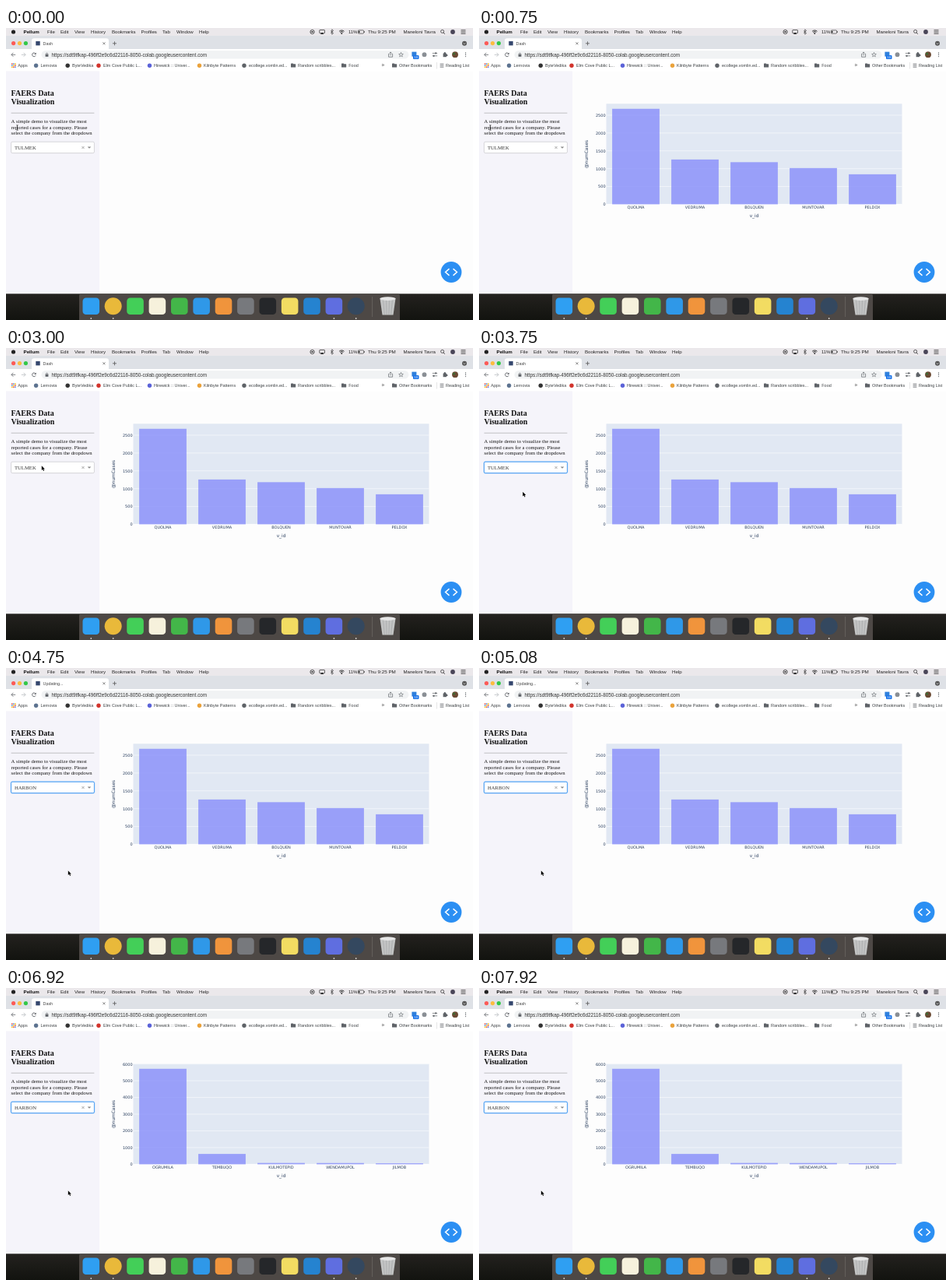
An HTML page with a canvas that plays this animation: 600 by 375 pixels, repeating every 8 s.

```html
<!DOCTYPE html>
<html lang="en">
<head>
<meta charset="utf-8">
<title>Dash</title>
<style>
  html, body { margin: 0; width: 100%; height: 100%; overflow: hidden; background: #fdfdfd; }
  canvas { display: block; width: 600px; height: 375px; }
</style>
</head>
<body>
<canvas id="stage"></canvas>
<script>
const W = 600, H = 375, LOOP = 8000;
const UI = '"Liberation Sans", Arial, sans-serif';
const SERIF = '"Liberation Serif", Times, serif';
const CHART = '"DejaVu Sans", Verdana, sans-serif';

const canvas = document.getElementById('stage');
const dpr = window.devicePixelRatio || 1;
canvas.width = W * dpr;
canvas.height = H * dpr;
const ctx = canvas.getContext('2d');

// Moments (ms) at which the page changes state
const SHOWN = 250, FOCUSED = 3250, PICKED = 4500, UPDATED = 5300;

const FIRST = {
  names: ['QUOLMA', 'VEDRUMA', 'BOLQUEN', 'MUNTOVAR', 'PELDOX'],
  values: [2680, 1257, 1182, 1017, 842], step: 500
};
const SECOND = {
  names: ['OGRUMILA', 'TEMBUQO', 'KULMOTEPID', 'WENDAMUPOL', 'JILMOB'],
  values: [5715, 620, 80, 76, 60], step: 1000
};

// Pointer stops: time, x, y
const PATH = [
  [1050, 14.5, 128], [1700, 85.5, 100.2], [2250, 85.5, 100.2],
  [2900, 45.8, 151.2], [3400, 45.8, 151.2], [4350, 79.8, 260.2]
];

function text(s, x, y, size, color = '#333', font = UI, align = 'left', weight = 'normal') {
  ctx.font = `${weight} ${size}px ${font}`;
  ctx.textAlign = align;
  ctx.fillStyle = color;
  ctx.fillText(s, x, y);
}

function rect(x, y, w, h, color) {
  ctx.fillStyle = color;
  ctx.fillRect(x, y, w, h);
}

function box(x, y, w, h, r, fill, stroke, width = 0.6) {
  ctx.beginPath();
  ctx.roundRect(x, y, w, h, r);
  if (fill) { ctx.fillStyle = fill; ctx.fill(); }
  if (stroke) { ctx.strokeStyle = stroke; ctx.lineWidth = width; ctx.stroke(); }
}

function disc(x, y, r, fill) {
  ctx.beginPath();
  ctx.arc(x, y, r, 0, Math.PI * 2);
  ctx.fillStyle = fill;
  ctx.fill();
}

function arc(x, y, r, from, to, color, width = 0.8) {
  ctx.beginPath();
  ctx.arc(x, y, r, from, to);
  ctx.strokeStyle = color;
  ctx.lineWidth = width;
  ctx.stroke();
}

function line(points, color, width = 0.8) {
  ctx.beginPath();
  points.forEach(([x, y]) => ctx.lineTo(x, y));
  ctx.strokeStyle = color;
  ctx.lineWidth = width;
  ctx.stroke();
}

function shape(points, fill, stroke, width = 0.6) {
  ctx.beginPath();
  points.forEach(([x, y]) => ctx.lineTo(x, y));
  ctx.closePath();
  if (stroke) { ctx.strokeStyle = stroke; ctx.lineWidth = width; ctx.stroke(); }
  ctx.fillStyle = fill;
  ctx.fill();
}

function menuBar() {
  const ink = '#222';
  rect(0, 0, W, 10, '#ebe8eb');
  disc(9.5, 5, 2.6, ink);
  text('Pellum', 22.5, 7.1, 6.2, '#111', UI, 'left', 'bold');
  const items = [['File', 53], ['Edit', 70], ['View', 88], ['History', 109], ['Bookmarks', 136],
    ['Profiles', 173.5], ['Tab', 201], ['Window', 219], ['Help', 248]];
  items.forEach(([s, x]) => text(s, x, 7.1, 6.1, ink));

  arc(393.5, 5, 2.6, 0, 7, ink);
  disc(393.5, 5, 1.1, ink);
  box(402.8, 2.5, 6.6, 4.2, 0.6, null, ink, 0.7);
  shape([[404, 8], [408.2, 8], [406.1, 5.4]], ink);
  line([[417, 3.4], [420.6, 6.7], [418.8, 8.2], [418.8, 1.8], [420.6, 3.4], [417, 6.7]], ink, 0.6);
  [1.4, 3, 4.6].forEach(r => arc(431.3, 7.6, r, -2.35, -0.8, ink, 0.9));
  disc(431.3, 7.4, 0.7, ink);
  text('11%', 440, 7.1, 5.9, ink);
  box(452.2, 2.9, 7.4, 4.2, 1, null, ink, 0.6);
  rect(453, 3.7, 1.4, 2.6, ink);
  rect(460.2, 4.2, 0.7, 1.6, ink);
  text('Thu 9:25 PM', 465, 7.1, 6.25, ink);
  text('Maneloni Tavra', 510.5, 7.1, 6.1, ink);
  arc(560.6, 4.4, 2, 0, 7, ink, 0.7);
  line([[562, 5.9], [563.8, 7.8]], ink, 0.8);
  disc(574, 5, 2.9, '#4a4658');
  [2.8, 5, 7.2].forEach(y => line([[584.5, y], [590.5, y]], ink, 0.8));
}

function tabStrip(title) {
  rect(0, 10, W, 18, '#dee1e6');
  disc(9.6, 19.6, 2.6, '#fc5b57');
  disc(17.5, 19.6, 2.6, '#fdbc40');
  disc(25.4, 19.6, 2.6, '#34c84a');
  box(33, 13.2, 99, 18, 3.2, '#fff');
  rect(38.3, 17, 5.4, 5.4, '#35476e');
  text(title, 47.5, 21.9, 5.4, '#444');
  line([[124.4, 18.3], [127.4, 21.3]], '#555', 0.7);
  line([[127.4, 18.3], [124.4, 21.3]], '#555', 0.7);
  line([[137, 19.8], [142, 19.8]], '#555');
  line([[139.5, 17.3], [139.5, 22.3]], '#555');
  disc(589, 19.8, 3, '#555');
  line([[587.6, 19.3], [589, 20.7], [590.4, 19.3]], '#fff', 0.7);
}

function toolbar() {
  const ink = '#5f6368', pale = '#b7babf';
  rect(0, 27, W, 14, '#fff');
  line([[12.2, 34.3], [7, 34.3]], ink);
  line([[9.4, 31.8], [6.9, 34.3], [9.4, 36.8]], ink);
  line([[19.8, 34.3], [25, 34.3]], pale);
  line([[22.6, 31.8], [25.1, 34.3], [22.6, 36.8]], pale);
  arc(36, 34.3, 2.4, 0.4, 5.5, ink, 0.9);
  shape([[38.7, 31.5], [38.7, 34], [36.2, 34]], ink);

  box(45.5, 29, 472, 10.6, 5.3, '#f1f3f4');
  rect(50.6, 33.6, 3.8, 3.2, ink);
  arc(52.5, 33.4, 1.2, Math.PI, 0, ink, 0.7);
  text('https://sdt9tfkap-496ff2e9c6d22116-8050-colab.googleusercontent.com', 58.5, 36.5, 6.34, '#333');

  line([[492.6, 33.2], [491.6, 33.2], [491.6, 37.2], [496.6, 37.2], [496.6, 33.2], [495.6, 33.2]], ink, 0.7);
  line([[494.1, 35.4], [494.1, 31]], ink, 0.7);
  line([[492.8, 32.2], [494.1, 30.9], [495.4, 32.2]], ink, 0.7);
  const star = Array.from({ length: 11 }, (_, i) => {
    const a = i * Math.PI / 5 - Math.PI / 2, r = i % 2 ? 1.3 : 3;
    return [507.5 + r * Math.cos(a), 34.4 + r * Math.sin(a)];
  });
  line(star, ink, 0.6);

  rect(521.4, 30.6, 6, 6, '#2f80dc');
  box(523, 35, 7.5, 5, 1, '#1a73e8');
  text('10', 526.8, 39.2, 4.4, '#fff', UI, 'center');
  disc(537.5, 34.2, 2.9, '#8a8f95');
  [[32.4, 552.2], [35.8, 549.6]].forEach(([y, x]) => {
    line([[547.8, y], [554.2, y]], ink, 0.7);
    disc(x, y, 1.1, ink);
  });
  rect(561.6, 32.6, 4.4, 4.6, ink);
  disc(563.8, 32.2, 1.2, ink);
  disc(566.3, 34.9, 1.2, ink);
  disc(577, 34.2, 3.9, '#6b4a33');
  disc(575.6, 33, 1.6, '#3f6a35');
  [32, 34.3, 36.6].forEach(y => disc(590.5, y, 0.7, ink));
}

function folder(x) {
  box(x - 3, 45.6, 3.2, 2, 0.5, '#5f6368');
  box(x - 3, 46.2, 6.2, 4.3, 0.5, '#5f6368');
}

function bookmarks() {
  const y = 50.1, size = 5.45;
  rect(0, 41, W, 14.5, '#fff');
  const dots = ['#ea4335', '#4285f4', '#fbbc04'];
  for (let i = 0; i < 9; i++) {
    rect(7 + (i % 3) * 2.1, 45.3 + Math.floor(i / 3) * 2.1, 1.5, 1.5, dots[(i + Math.floor(i / 3)) % 3]);
  }
  const links = [['Apps', 15.3], ['Lernovia', 44.5], ['ByteVedika', 85], ['Elm Cove Public L...', 125],
    ['Hirewick :: Univer...', 190], ['Kilnbyte Patterns', 254], ['ecollege.vomlin.ed...', 312],
    ['Random scribbles...', 375], ['Food', 440.3], ['Other Bookmarks', 505], ['Reading List', 565]];
  links.forEach(([s, x]) => text(s, x, y, size, '#3c4043'));
  const marks = [[38.6, '#5d7390'], [79.2, '#333'], [119, '#d2342c'], [184.5, '#5b63d8'],
    [248.5, '#eaa23b'], [306, '#5f6368']];
  marks.forEach(([x, color]) => disc(x, 48.2, 2.7, color));
  [369, 434, 499].forEach(folder);
  text('»', 482.5, 50.1, 6.5, '#444');
  line([[553.5, 44], [553.5, 52.5]], '#ccc', 0.5);
  [46.2, 48.2, 50.2].forEach(v => line([[557.6, v], [562.4, v]], '#5f6368', 0.8));
}

function sidebar(value, focused) {
  rect(0, 55.5, 120, 286, '#f5f4fa');
  text('FAERS Data', 6.6, 86.7, 10, '#111', SERIF, 'left', 'bold');
  text('Visualization', 6.6, 98.4, 10, '#111', SERIF, 'left', 'bold');
  line([[6.6, 109.2], [113.4, 109.2]], '#b4b3b8', 0.8);
  ['A simple demo to visualize the most', 'reported cases for a company. Please',
    'select the company from the dropdown'].forEach((s, i) =>
    text(s, 6.6, 122.4 + i * 7.5, 6.67, '#161616', SERIF));

  if (focused) box(6.6, 146.2, 106.8, 14.4, 1.8, null, '#b9dbfb', 2);
  box(6.6, 146.2, 106.8, 14.4, 1.6, '#fff', focused ? '#3b93f0' : '#c6c6ca', focused ? 0.9 : 0.7);
  text(value, 11, 155.6, 6.67, '#333', SERIF);
  line([[97.4, 151.9], [100.6, 155.1]], '#888', 0.7);
  line([[100.6, 151.9], [97.4, 155.1]], '#888', 0.7);
  shape([[104.7, 152.4], [109.3, 152.4], [107, 154.8]], '#888');
}

function chart({ names, values, step }) {
  const left = 163.5, right = 543.5, top = 97.3, base = 226.4, ink = '#2a3f5f';
  const max = values[0] / 0.95, slot = (right - left) / names.length;
  const yOf = v => base - v / max * (base - top);
  rect(left, top, right - left, base - top, '#e1e8f3');
  for (let v = 0; v < max; v += step) {
    line([[left, yOf(v)], [right, yOf(v)]], '#fff', v ? 0.5 : 0.9);
    text(v, 162.6, yOf(v) + 1.9, 5, ink, CHART, 'right');
  }
  names.forEach((name, i) => {
    const x = left + slot * i, y = yOf(values[i]);
    rect(x + slot * 0.1, y, slot * 0.8, base - y, 'rgba(131,137,252,0.76)');
    text(name, x + slot / 2, 232.1, 5, ink, CHART, 'center');
  });
  text('v_id', 353.5, 243.4, 5.83, ink, CHART, 'center');
  ctx.save();
  ctx.translate(140, 162);
  ctx.rotate(-Math.PI / 2);
  text('@numCases', 0, 0, 5.83, ink, CHART, 'center');
  ctx.restore();
}

function codeButton() {
  disc(572, 313.5, 13.4, '#2b8ff3');
  ctx.lineCap = 'round';
  line([[569, 309.6], [564.6, 313.5], [569, 317.4]], '#fff', 1.5);
  line([[575, 309.6], [579.4, 313.5], [575, 317.4]], '#fff', 1.5);
  ctx.lineCap = 'butt';
}

function dock() {
  const ground = ctx.createLinearGradient(0, 341, 0, H);
  ground.addColorStop(0, '#24221f');
  ground.addColorStop(1, '#12130f');
  rect(0, 341.3, W, 34, ground);
  box(94, 341.6, 412, 40, 2.5, '#4d4845');

  const icons = ['#2f9ff2', '#e9b93a', '#43cf58', '#f6f1dc', '#43b649', '#2f98e8', '#f0943c',
    '#77797d', '#25272a', '#f2dc62', '#2583d0', '#5f6ee0', '#34485f'];
  const round = [1, 12];
  icons.forEach((color, i) => {
    const x = 109.3 + i * 28.37;
    if (round.includes(i)) disc(x, 357.3, 11, color);
    else box(x - 10.8, 346.5, 21.6, 21.6, 4.4, color);
  });
  [109.3, 137.7, 421.4, 449.7].forEach(x => disc(x, 373, 0.9, '#d5d2cf'));
  line([[470.6, 345], [470.6, 371]], '#77726e', 0.6);

  shape([[480.5, 347.5], [500.5, 347.5], [497.5, 368.5], [483.5, 368.5]], '#c3c4c4');
  for (let i = 1; i < 5; i++) {
    line([[480.5 + i * 4, 349], [483.5 + i * 2.8, 368]], '#a0a2a3', 0.6);
  }
  ctx.beginPath();
  ctx.ellipse(490.5, 347.6, 10.2, 2.4, 0, 0, Math.PI * 2);
  ctx.fillStyle = '#e6e6e6';
  ctx.fill();
}

function pointerAt(t) {
  if (t <= PATH[0][0]) return PATH[0].slice(1);
  for (let i = 1; i < PATH.length; i++) {
    const [t0, x0, y0] = PATH[i - 1], [t1, x1, y1] = PATH[i];
    if (t < t1) {
      const k = (t - t0) / (t1 - t0), e = k * k * (3 - 2 * k);
      return [x0 + (x1 - x0) * e, y0 + (y1 - y0) * e];
    }
  }
  return PATH[PATH.length - 1].slice(1);
}

function pointer(t) {
  const [x, y] = pointerAt(t);
  if (t < PATH[0][0]) {
    line([[x, y - 3], [x, y + 3]], '#222', 0.8);
    [-3.2, 3.2].forEach(d => line([[x - 1.3, y + d], [x + 1.3, y + d]], '#222', 0.6));
    return;
  }
  const arrow = [[0, 0], [0, 5.8], [1.4, 4.6], [2.3, 6.7], [3.3, 6.2], [2.4, 4.3], [4.1, 4.2]];
  shape(arrow.map(([dx, dy]) => [x + dx, y + dy]), '#000', '#fff', 1);
}

function draw(now) {
  const frame = 1000 / 12;
  const t = Math.floor((now % LOOP) / frame + 0.05) * frame;
  ctx.setTransform(dpr, 0, 0, dpr, 0, 0);
  rect(0, 0, W, H, '#fdfdfd');
  menuBar();
  tabStrip(t >= PICKED && t < UPDATED ? 'Updating...' : 'Dash');
  toolbar();
  bookmarks();
  sidebar(t < PICKED ? 'TULMEK' : 'HARBON', t >= FOCUSED);
  if (t >= SHOWN) chart(t < UPDATED ? FIRST : SECOND);
  codeButton();
  dock();
  pointer(t);
}

const start = performance.now();
function tick() {
  draw(performance.now() - start);
  requestAnimationFrame(tick);
}
tick();
</script>
</body>
</html>
```
